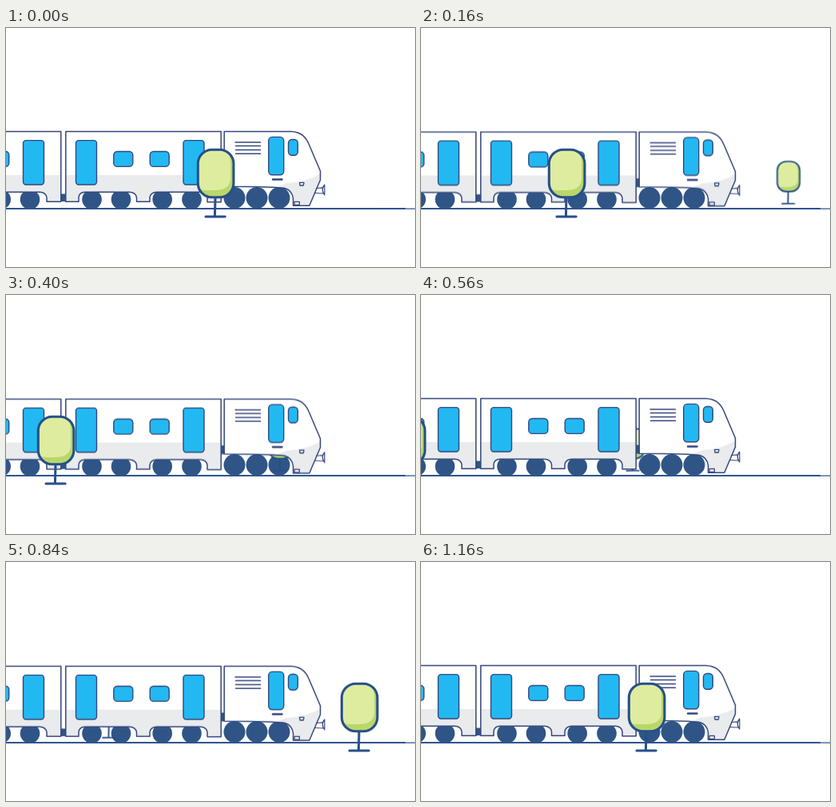
Recreate the animation shown at these times as an HTML page. Size 512 by 299 pixels, loop 1200 ms.

```html
<!DOCTYPE html>
<html lang="en">
<head>
<meta charset="utf-8">
<title>Train ride</title>
<style>
  html, body { margin: 0; width: 100%; height: 100%; overflow: hidden; background: #fff; }
  svg { display: block; width: 100%; height: 100%; }
  .line { fill: none; stroke: #35467c; stroke-width: 1.5; stroke-linejoin: round; stroke-linecap: round; }
  .shell { fill: #fff; }
  .shade { fill: #e9ebed; }
  .glass { fill: #22b9f2; stroke: #35467c; stroke-width: 1.4; }
  .navy { fill: #2f5586; }
  .front { animation: front 1.2s steps(30) -0.6s infinite; }
  .back { animation: back 1.2s steps(30) infinite; }
  .bob { animation: bob .3s ease-in-out infinite alternate; }
  @keyframes front { from { transform: translate(562px, 236px); } to { transform: translate(-38px, 236px); } }
  @keyframes back { from { transform: translate(537.5px, 219.8px); } to { transform: translate(-46.5px, 219.8px); } }
  @keyframes bob { from { transform: translateY(0); } to { transform: translateY(.9px); } }
</style>
</head>
<body>
<svg viewBox="0 0 512 299">
  <defs>
    <!-- origin at the foot of the tree -->
    <g id="tree">
      <path d="M0-24L-.6 0M-12 .1Q-4-.7 12.2 0" fill="none" stroke="#27508a" stroke-width="3" stroke-linecap="round"/>
      <rect x="-21.7" y="-83.8" width="44.6" height="59.6" rx="17.5" fill="#bad76a"/>
      <path d="M-21.5-35V-67Q-21.5-83.5-4-83.5H5Q19-83.5 19-68V-48Q19-33-1-33H-12Q-19-33-21.5-37Z" fill="#deec9f"/>
      <rect x="-21.7" y="-83.8" width="44.6" height="59.6" rx="17.5" fill="none" stroke="#27508a" stroke-width="3.1"/>
    </g>
    <path id="tail" d="M-10 129.4H68.8V217.3H51V212Q50 205.5 42 205.2H-10Z"/>
    <path id="car" d="M74.8 129.4H269.2V217.8H252V212Q251 205.5 243 205.2H189Q181 205.5 180 212V217.3H163.500V212Q162.500 205.500 154 205.200H99Q91.500 205.500 91 212V217.300H74.800Z"/>
    <path id="engine" d="M273.2 129.4H357Q373 130 379 145L393.500 179V190L379.800 222.300H359.500V213Q358 203 349 200.500Q340 198.500 273.200 198.200Z"/>
    <clipPath id="hull">
      <use href="#tail"/><use href="#car"/>
    </clipPath>
    <clipPath id="nose"><use href="#engine"/></clipPath>
  </defs>

  <path d="M0 226H500" stroke="#2f5590" stroke-width="1.9"/>
  <path d="M466 226.1H512" stroke="#2f5590" stroke-width="1.2"/>

  <g class="navy">
    <circle cx="-6" cy="214.500" r="12"/>
    <circle cx="30" cy="214.500" r="12.300"/>
    <circle cx="107.500" cy="214.500" r="12.300"/>
    <circle cx="144" cy="214.500" r="12.300"/>
    <circle cx="195.700" cy="214.500" r="12.300"/>
    <circle cx="232.500" cy="214.500" r="12.300"/>
    <circle cx="286" cy="212.500" r="13.500"/>
    <circle cx="314" cy="212.500" r="13.500"/>
    <circle cx="342" cy="212.500" r="13.500"/>
  </g>

  <g class="back"><use href="#tree" transform="scale(.63)"/></g>

  <g class="bob">
    <path class="navy" d="M68 207.500H75.500V217H68ZM268.500 187.500H274V198.500H268.500Z"/>
    <g class="shell"><use href="#tail"/><use href="#car"/><use href="#engine"/></g>
    <rect class="shade" y="184" width="270" height="36" clip-path="url(#hull)"/>
    <path class="shade" d="M335 200L352 194Q380 192 395 181V224H340Z" clip-path="url(#nose)"/>
    <g class="line"><use href="#tail"/><use href="#car"/><use href="#engine"/></g>

    <g class="glass">
      <rect x="-20" y="154.500" width="23.700" height="18.700" rx="4"/>
      <rect x="21.500" y="140.600" width="26" height="55.400" rx="3.500"/>
      <rect x="87.500" y="140.600" width="26" height="55.400" rx="3.500"/>
      <rect x="134.800" y="154.500" width="24" height="18.900" rx="4.500"/>
      <rect x="180.200" y="154.500" width="24" height="18.900" rx="4.500"/>
      <rect x="222" y="140.600" width="26" height="55.400" rx="3.500"/>
      <rect x="328.700" y="136.400" width="19" height="47.400" rx="4.500"/>
      <rect x="353.500" y="139.500" width="11.800" height="19.700" rx="4.500"/>
    </g>

    <path class="line" d="M287 143H318.500M287.500 147.500H318.500M287.500 152.500H318.500M287.500 157.200H318.500"/>
    <path class="line" d="M334 189.500H345.500" style="stroke-width:2.400"/>
    <path class="line" d="M367.500 193.300H373L372.300 197H368ZM361 217.300H367.300V221.300H361Z" style="stroke-width:1.300"/>
    <path class="line" d="M388.500 200.500L396 199.800M386.500 206.500L396.500 207M398.800 196Q393.500 202 398.800 209Z" style="stroke-width:1.200"/>
  </g>

  <g class="front"><use href="#tree"/></g>
</svg>
</body>
</html>
```
